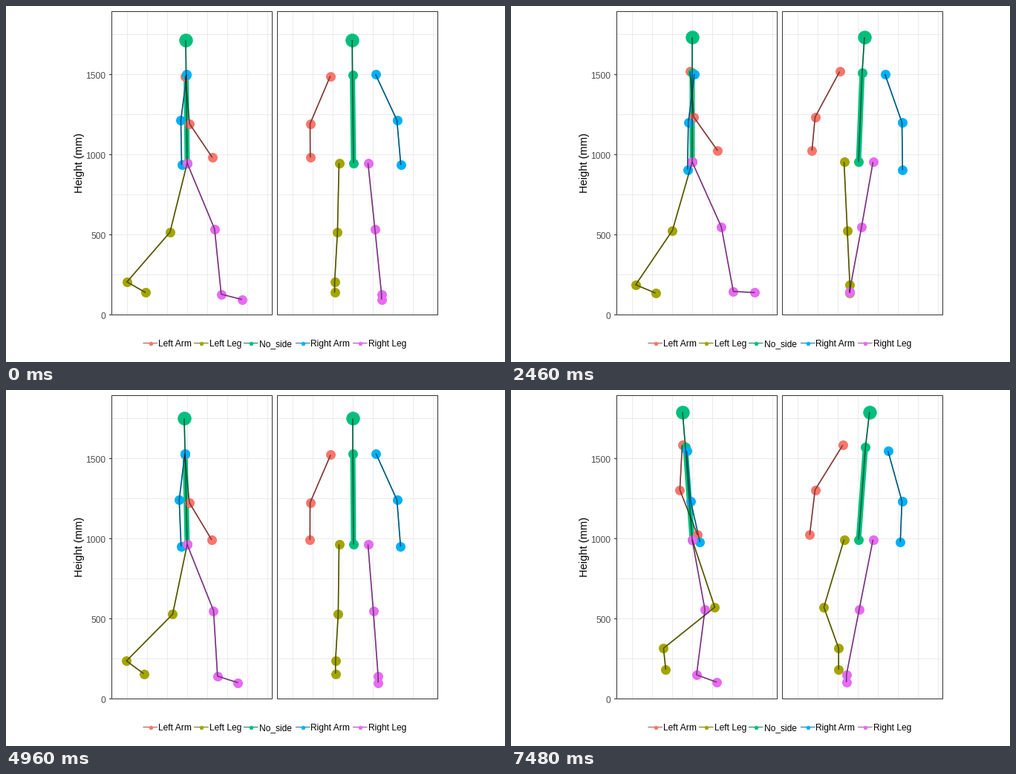
Animation, 672 px wide and 480 px high, one loop 7500 ms. Source, as a matplotlib script:

```python
import numpy as np
import matplotlib.pyplot as plt
from matplotlib.animation import FuncAnimation
from matplotlib.collections import LineCollection
from matplotlib.patches import Rectangle

W, H, DPI = 672, 480, 100
PX = 72 / DPI  # points per pixel
FRAMES, STEP = 375, 20
TAU = 2 * np.pi

plt.rcParams["font.family"] = "Liberation Sans"

COLORS = {
    "Left Arm": "#F8766D",
    "Left Leg": "#A3A500",
    "No_side": "#00BF7D",
    "Right Arm": "#00B0F6",
    "Right Leg": "#E76BF3",
}

# ---- walk: strides done, heading, lean and trunk twist at a few moments ----
t = np.arange(FRAMES) * STEP
u = t / t[-1]
MOMENTS = [0, 960, 2460, 3880, 4960, 6300, 7480]


def keyed(*values):
    return np.interp(t, MOMENTS, values)


stride = keyed(0.07, 0.77, 2.03, 3.24, 4.09, 5.20, 6.24)
turn = keyed(0.19, 0.61, -0.30, -0.50, 0.15, 0.23, -0.64)
lean = keyed(-2, 11, 0, -2, -4, -7, -13)
twist = keyed(-2, 3, -6, 10, 0, -4, -6)
bob = 3 * np.cos(2 * TAU * (stride - 0.05))

SIDE_X, FRONT_X = 244, 468  # pelvis in the two views


def joint(side, front, y):
    """Side x, front x and y of a joint over the whole loop."""
    return np.array(np.broadcast_arrays(SIDE_X + side, FRONT_X + front, y + bob))


def harmonics(phase, mean, *pairs):
    """Angle in radians from a Fourier series given in degrees."""
    angle = mean + sum(a * np.cos(k * TAU * phase) + b * np.sin(k * TAU * phase)
                       for k, (a, b) in enumerate(pairs, 1))
    return np.radians(angle)


def pulse(phase, centre, width):
    gap = (phase - centre + 0.5) % 1 - 0.5
    return np.exp(-(gap / width) ** 2)


def leg(s):
    """s is -1 for left, 1 for right; phase 0 is heel strike."""
    phase = stride + (0.5 if s < 0 else 0)
    thigh = harmonics(phase, 9.8, (20.9, -4.2), (-5, -3), (-0.4, 1.3))
    shank = harmonics(phase, -18.5, (22.4, 16.6), (10, -7), (-0.9, -3.9))
    foot = np.radians(20 + 70 * pulse(phase, 0.71, 0.1) - 22 * pulse(phase, 0, 0.06))

    out, hip_y = 19.5 * s, 209 - 5 * u
    knee_x, knee_y = 96 * np.sin(thigh), hip_y + 96 * np.cos(thigh)
    ankle_x, ankle_y = knee_x + 88.5 * np.sin(shank), knee_y + 88.5 * np.cos(shank)
    foot_front = out + turn * (50 + ankle_x)
    return [joint(0, out, hip_y),
            joint(knee_x, out + turn * (12 + knee_x), knee_y),
            joint(ankle_x, foot_front, ankle_y),
            joint(ankle_x + 29 * np.cos(foot), foot_front, ankle_y + 29 * np.sin(foot))]


def arm(s):
    """Arms swing against the legs and drop on the side the body tilts to."""
    swing = -s * np.cos(TAU * (stride + 0.1))
    tilt = -s * turn
    return [joint(0.8 * lean - 0.5 * s * twist, 1.5 + 30.5 * s - 12 * turn,
                  90.5 - 10 * u + 6 * tilt),
            joint(0.6 * lean - s * twist - 1.5 - 3.5 * s + 9 * swing, 58.5 * s,
                  153.5 - 9 * u + 12 * tilt),
            joint(0.4 * lean - s * twist + 14 - 14 * s + 18 * swing, 1 + 61 * s + 9 * turn,
                  206.5 - 4 * u + 12 * tilt + 2.5 * s - 10 * swing)]


def trunk():
    return [joint(lean, 2 - 20 * turn, 43 - 11 * u),
            joint(0.7 * lean, 1 - 13 * turn, 90.5 - 11 * u),
            joint(0, 0, 209 - 5 * u)]


# limb -> array (joint, axis, frame)
paths = {name: np.array(points) for name, points in {
    "Left Arm": arm(-1), "Left Leg": leg(-1), "No_side": trunk(),
    "Right Arm": arm(1), "Right Leg": leg(1)}.items()}

# ---- chart ----
fig = plt.figure(figsize=(W / DPI, H / DPI), dpi=DPI, facecolor="white")
ax = fig.add_axes([0, 0, 1, 1])
ax.set(xlim=(0, W), ylim=(H, 0))
ax.axis("off")


def segments(lines, color):
    ax.add_collection(LineCollection(lines, colors=color, linewidths=PX,
                                     snap=False, zorder=1))


def label(x, y, text, size=12, **kw):
    ax.text(x, y, text, fontsize=size * PX, va="baseline", **kw)


TOP, BASE, WIDTH = 7.5, 416.5, 216
for left in (142.5, 365.5):
    grid = [[(left, y), (left + WIDTH, y)] for y in BASE - 54 * np.arange(1, 8)]
    grid += [[(x, TOP), (x, BASE)] for x in left + 21 + 27 * np.arange(8)]
    segments(grid, "#EBEBEB")
    ax.add_patch(Rectangle((left, TOP), WIDTH, BASE - TOP, fill=False, ec="#333333",
                           lw=PX, snap=False, zorder=6))

for mm in range(0, 2000, 500):
    y = BASE - mm * 0.216
    segments([[(139, y), (142, y)]], "#333333")
    label(134.5, y + 5, str(mm), color="#4D4D4D", ha="right")
label(103, 212, "Height (mm)", 14.67, rotation=90, rotation_mode="anchor", ha="center")


def bone(color, width=1.6, xs=(), ys=(), **kw):
    return ax.plot(xs, ys, color=color, lw=width * PX, snap=False,
                   solid_capstyle="butt", **kw)[0]


def dots(color, size, xs=(), ys=()):
    return ax.plot(xs, ys, "o", color=color, ms=size * PX, mew=0,
                   snap=False, zorder=4)[0]


for (name, color), x in zip(COLORS.items(), (194.5, 263, 330, 400, 477)):
    ends, level = (x - 10, x + 9.5), (454.5, 454.5)
    bone(color, 1, ends, level)
    bone("black", 1, ends, level, alpha=0.3)
    dots(color, 5.5, [x], [454.5])
    label(x + 10.5, 459, name, color="black")

# Each entry: artist, limb, view (0 side, 1 front), joints it runs through.
parts = []
for view in (0, 1):
    for limb, color in COLORS.items():
        every = slice(None)
        parts += [(bone(color, zorder=3), limb, view, every),
                  (dots(color, 13), limb, view, every),
                  (bone("black", alpha=0.5, zorder=5), limb, view, every)]
        if limb == "No_side":
            parts += [(bone(color, 7, zorder=3), limb, view, slice(1, 3)),
                      (dots(color, 18.5), limb, view, slice(0, 1))]


def draw(i):
    for artist, limb, view, joints in parts:
        p = paths[limb][joints, :, i]
        artist.set_data(p[:, view], p[:, 2])
    return [part[0] for part in parts]


anim = FuncAnimation(fig, draw, frames=FRAMES, interval=STEP, repeat=True,
                     repeat_delay=0, blit=False)
plt.show()
```
